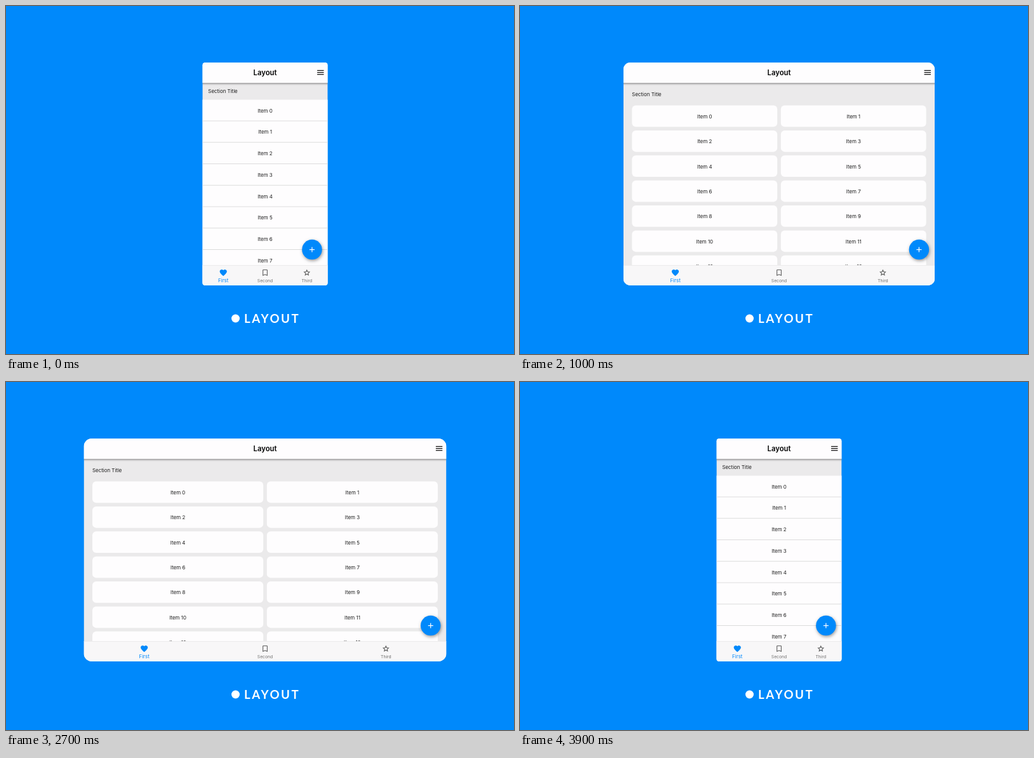
These frames come from a looping animation (800x548 px, 4 s). An HTML page with a canvas:

```html
<!DOCTYPE html>
<html lang="en">
<head>
<meta charset="utf-8">
<title>Layout</title>
<style>
  html, body { margin: 0; width: 100%; height: 100%; overflow: hidden; background: #0089fb; }
  canvas { display: block; }
</style>
</head>
<body>
<canvas id="stage" width="800" height="548"></canvas>
<script>
const ctx = document.getElementById('stage').getContext('2d');

const BLUE = '#0089fb', INK = '#1c1c1c', GRAY = '#707070', PAPER = '#ebeaeb';
const LOOP = 4000, STEP = 100;
const DP = 0.5625;              // stage pixels per layout unit
const CENTER = 408, TOP = 89, BOTTOM = 440, HEADER = 121, NAV = 408;
const NARROW = 196.6, WIDE = 629;
const ROW = 60 * DP, GAP = 10 * DP;

// Steep symmetric cubic bezier (.84, 0, .16, 1), solved by bisection.
function ease(x) {
  if (x <= 0) return 0;
  if (x >= 1) return 1;
  let lo = 0, hi = 1, s = 0.5;
  for (let i = 0; i < 24; i++) {
    const r = 1 - s;
    const bx = 2.52 * s * r * r + 0.48 * s * s * r + s * s * s;
    if (bx < x) lo = s; else hi = s;
    s = (lo + hi) / 2;
  }
  return s * s * (3 - 2 * s);
}

function frameWidth(t) {
  const open = t < 1920 ? ease((t + 123) / 2100) : 1 - ease((t - 1912) / 2100);
  return NARROW + (WIDE - NARROW) * open;
}

function rect(x, y, w, h, color) {
  ctx.fillStyle = color;
  ctx.fillRect(x, y, w, h);
}

function roundRect(x, y, w, h, r, color) {
  ctx.beginPath();
  ctx.roundRect(x, y, w, h, r);
  ctx.fillStyle = color;
  ctx.fill();
}

function shade(x, y, w, h, dx, dy, alpha) {
  const x0 = dx < 0 ? x + w : x;
  const g = ctx.createLinearGradient(x0, y, x0 + dx * w, y + dy * h);
  g.addColorStop(0, `rgba(0,0,0,${alpha})`);
  g.addColorStop(1, 'rgba(0,0,0,0)');
  rect(x, y, w, h, g);
}

// y is the middle of the capital letters.
function text(str, x, y, size, color = INK, align = 'left', weight = 400) {
  ctx.font = `${weight} ${size}px Inter, sans-serif`;
  ctx.textAlign = align;
  ctx.fillStyle = color;
  ctx.fillText(str, x, y + size * 0.364);
}

const heart = new Path2D('M12 21.4L10.5 20C5.4 15.4 2 12.3 2 8.5 2 5.4 4.4 3 7.5 3c1.7 0 3.4.8 4.5 2.1C13.1 3.8 14.8 3 16.5 3 19.6 3 22 5.4 22 8.5c0 3.8-3.4 6.9-8.5 11.5z');

const bookmark = new Path2D('M6 19.5V5a1 1 0 0 1 1-1h10a1 1 0 0 1 1 1v14.5l-6-2.6z');

const star = new Path2D();
for (let i = 0; i < 10; i++) {
  const a = -Math.PI / 2 + i * Math.PI / 5, r = i % 2 ? 3.6 : 7.7;
  star.lineTo(12 + r * Math.cos(a), 12.4 + r * Math.sin(a));
}
star.closePath();

const lens = new Path2D();
lens.arc(9.5, 9.5, 5.5, 0, Math.PI * 2);
lens.moveTo(14, 14);
lens.lineTo(19.8, 19.8);

function icon(path, x, y, color, filled) {
  ctx.save();
  ctx.translate(x, y);
  ctx.scale(DP, DP);
  ctx.translate(-12, -12);
  ctx.fillStyle = ctx.strokeStyle = color;
  ctx.lineWidth = 2;
  if (filled) ctx.fill(path); else ctx.stroke(path);
  ctx.restore();
}

function drawList(left, right) {
  const top = 147.5;
  rect(left, top, right - left, BOTTOM - top, '#fefdfe');
  text('Section Title', left + 9, 134.5, 7.9);
  for (let i = 0; i < 8; i++) {
    const y = top + i * ROW;
    text('Item ' + i, CENTER, y + ROW / 2 + 0.4, 7.9, INK, 'center');
    rect(left, y + ROW - 0.7, right - left, 0.9, '#d9d9d9');
  }
}

function drawGrid(left, right, margin) {
  const top = HEADER + 2 * margin + 8.5;
  const cell = (right - left - 2 * margin - GAP) / 2;
  text('Section Title', left + margin, HEADER + margin + 4.5, 7.9);
  for (let i = 0; i < 16; i++) {
    const x = left + margin + (i % 2) * (cell + GAP);
    const y = top + (i >> 1) * (ROW + GAP);
    roundRect(x, y, cell, ROW, 6, '#fefdfe');
    text('Item ' + i, x + cell / 2, y + ROW / 2 + 0.5, 7.9, INK, 'center');
  }
}

function drawNav(left, width) {
  rect(left, NAV, width, BOTTOM - NAV, '#f8f7f8');
  rect(left, NAV, width, 0.6, '#e4e4e4');
  const items = [[heart, 'First'], [bookmark, 'Second'], [star, 'Third']];
  items.forEach(([path, label], i) => {
    const x = left + width * (2 * i + 1) / 6, on = i === 0;
    icon(path, x, 420, on ? BLUE : '#606060', on);
    text(label, x, 432.3, on ? 7.9 : 6.75, on ? BLUE : GRAY, 'center');
  });
}

function drawRail(left) {
  const w = 40.5, x = left + 20.25;
  rect(left, HEADER, w, BOTTOM - HEADER, '#fefdfe');
  shade(left + w, HEADER, 2.5, BOTTOM - HEADER, 1, 0, 0.16);
  icon(heart, x, 140.4, BLUE, true);
  text('First', x, 153, 7.3, BLUE, 'center', 500);
  icon(bookmark, x, 185.5, '#505050');
  icon(star, x, 226.3, '#505050');
}

function drawFilters(x, right) {
  rect(x, HEADER, right - x, BOTTOM - HEADER, '#f7f6f7');
  shade(x - 2, HEADER, 2, BOTTOM - HEADER, -1, 0, 0.14);
  icon(lens, x + 11.3, 133.4, '#555');
  text('Search', x + 22.5, 132.8, 9, '#555');
  rect(x, 147, right - x, 0.9, '#8c8c8c');
  text('Filters', x + 7, 164, 7.9);
  text('Brand1', x + 9, 192.5, 9);
  ctx.strokeStyle = '#666';
  ctx.lineWidth = 1.15;
  ctx.strokeRect(right - 22.6, 188, 9, 9);
}

function drawButton(x, y) {
  ctx.save();
  ctx.shadowColor = 'rgba(0,0,0,.4)';
  ctx.shadowBlur = 5;
  ctx.shadowOffsetX = 1;
  ctx.shadowOffsetY = 2;
  ctx.beginPath();
  ctx.arc(x, y, 15.75, 0, Math.PI * 2);
  ctx.fillStyle = BLUE;
  ctx.fill();
  ctx.restore();
  rect(x - 4, y - 0.6, 8, 1.2, '#fff');
  rect(x - 0.6, y - 4, 1.2, 8, '#fff');
}

function drawHeader(left, right, menu) {
  shade(left, HEADER, right - left, 4, 0, 1, 0.32);
  rect(left, TOP, right - left, HEADER - TOP, '#fefdfe');
  text('Layout', CENTER, 104.8, 11.25, '#000', 'center', 600);
  if (!menu) return;
  for (let i = -1; i <= 1; i++) rect(right - 16.6, 104 + i * 3.1, 10.4, 1.25, '#111');
}

function drawCaption() {
  ctx.beginPath();
  ctx.arc(361.5, 492, 6.5, 0, Math.PI * 2);
  ctx.fillStyle = '#fff';
  ctx.fill();
  ctx.font = '700 18.7px Lato, sans-serif';
  ctx.textAlign = 'left';
  ctx.letterSpacing = '2.6px';
  ctx.fillText('LAYOUT', 375, 498.8);
  ctx.letterSpacing = '0px';
}

function draw(t) {
  const width = frameWidth(t);
  const left = CENTER - width / 2, right = CENTER + width / 2;
  const units = width / DP, desktop = units >= 1024;

  rect(0, 0, 800, 548, BLUE);
  drawCaption();

  ctx.save();
  ctx.beginPath();
  ctx.roundRect(left, TOP, width, BOTTOM - TOP, width * 0.022);
  ctx.clip();
  rect(left, TOP, width, BOTTOM - TOP, PAPER);
  if (desktop) {
    const panel = right - 171.2;
    drawGrid(left + 41, panel, 24 * DP);
    drawRail(left);
    drawFilters(panel, right);
  } else {
    if (units < 600) drawList(left, right);
    else drawGrid(left, right, (units < 720 ? 16 : 24) * DP);
    drawNav(left, width);
  }
  drawHeader(left, right, !desktop);
  drawButton(right - 24.75, (desktop ? BOTTOM : NAV) - 24.4);
  ctx.restore();
}

const start = performance.now();
function tick() {
  const t = (performance.now() - start) % LOOP;
  draw(Math.floor(t / STEP) * STEP);
  requestAnimationFrame(tick);
}
tick();
</script>
</body>
</html>
```
